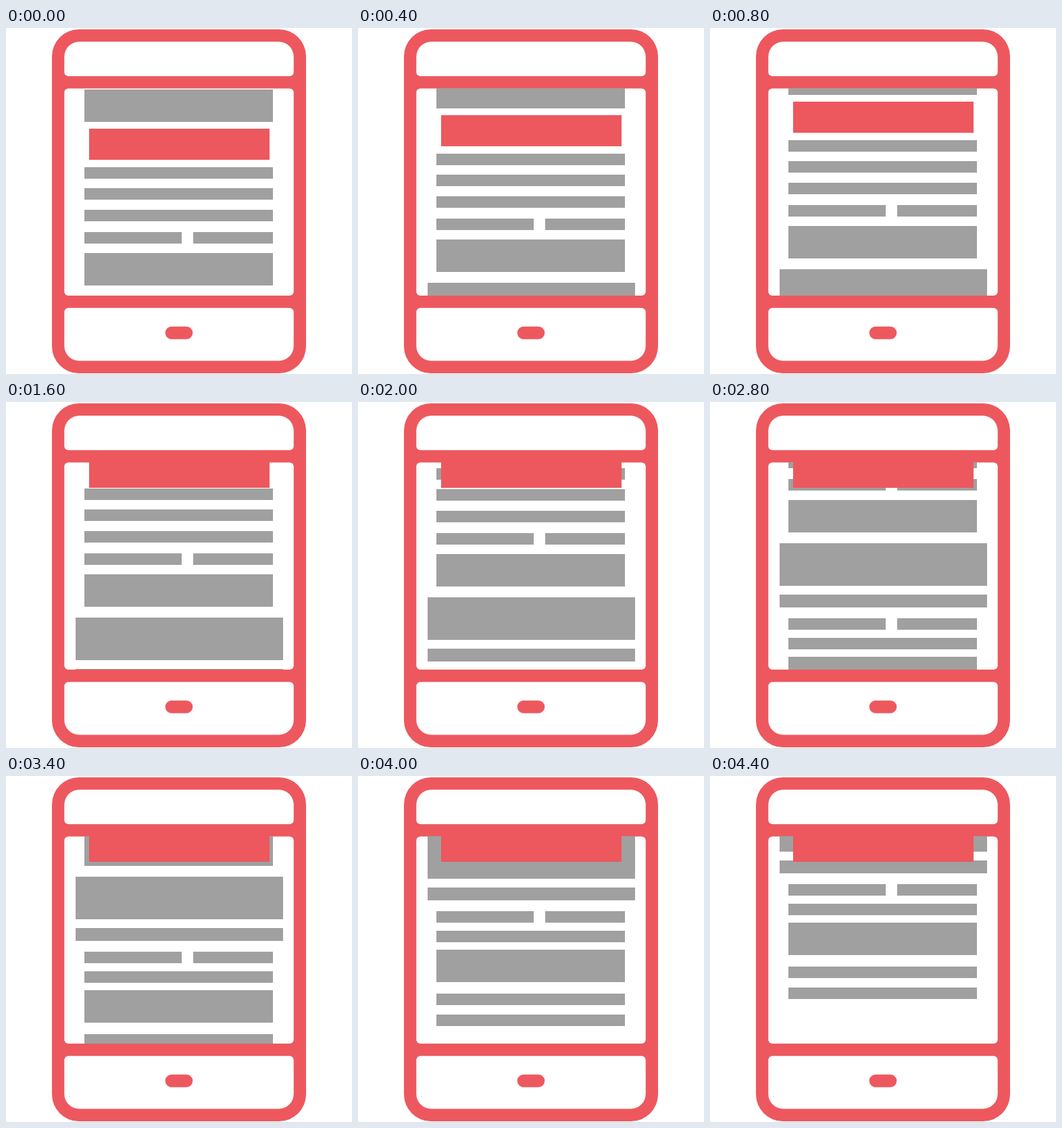
Recreate the animation shown at these times as an HTML page with a canvas. Size 512 px wide and 512 px high, loop 4500 ms.

```html
<!DOCTYPE html>
<html lang="en">
<head>
<meta charset="utf-8">
<title>Scrolling page with a sticky banner</title>
<style>
  html, body { margin: 0; width: 100%; height: 100%; overflow: hidden; background: #fff; }
  canvas { display: block; width: 512px; height: 512px; }
</style>
</head>
<body>
<canvas id="stage" width="512" height="512"></canvas>
<script>
const ctx = document.getElementById("stage").getContext("2d");
const RED = "#ed585e", GRAY = "#a0a0a0", WHITE = "#fff";
const LOOP = 4500, STEP = 200;

// Column spans as [left, right]
const FULL = [[116, 395]];
const WIDE = [[103, 410]];
const SPLIT = [[116, 260], [277, 395]];

// Page rows as [columns, top, height]
const ROWS = [
  [FULL, 91, 48],
  [FULL, 206, 17],
  [FULL, 237, 17],
  [FULL, 269, 17],
  [SPLIT, 302, 17],
  [FULL, 333, 48],
  [WIDE, 397, 63],
  [WIDE, 473, 19],
  [SPLIT, 508, 17],
  [FULL, 537, 17],
  [FULL, 565, 48],
  [FULL, 630, 17],
  [FULL, 661, 17]
];
const BANNER = { x: 123, y: 149, w: 267, h: 46, stickyTop: 81 };

// Slow scroll until the banner sticks, then twice as fast
function scrollAt(step) {
  if (step <= 6) return step * 10;
  if (step <= 9) return 68 + (step - 7) * 10;
  return 88 + (step - 9) * 20;
}

function panel(x, y, right, bottom, radii, color) {
  ctx.fillStyle = color;
  ctx.beginPath();
  ctx.roundRect(x, y, right - x, bottom - y, radii);
  ctx.fill();
}

function drawDevice() {
  panel(68, 2, 444, 511, 40, RED);
  panel(86.3, 20.3, 425.7, 71.2, [22, 22, 6, 6], WHITE);
  panel(86.3, 89.5, 425.7, 396, 6, WHITE);
  panel(86.3, 414.2, 425.7, 492.5, [6, 6, 22, 22], WHITE);
  panel(235.7, 441.8, 276.3, 460.4, 9.3, RED);
}

function drawPage(scroll) {
  ctx.save();
  ctx.beginPath();
  ctx.rect(86, 89, 340, 307);
  ctx.clip();
  ctx.fillStyle = GRAY;
  for (const [columns, top, height] of ROWS) {
    for (const [left, right] of columns) {
      ctx.fillRect(left, top - scroll, right - left, height);
    }
  }
  ctx.fillStyle = RED;
  const { x, y, w, h, stickyTop } = BANNER;
  ctx.fillRect(x, Math.max(y - scroll, stickyTop), w, h);
  ctx.restore();
}

function draw() {
  const step = Math.floor((performance.now() % LOOP) / STEP);
  ctx.fillStyle = WHITE;
  ctx.fillRect(0, 0, 512, 512);
  drawDevice();
  drawPage(scrollAt(step));
  requestAnimationFrame(draw);
}
draw();
</script>
</body>
</html>
```
